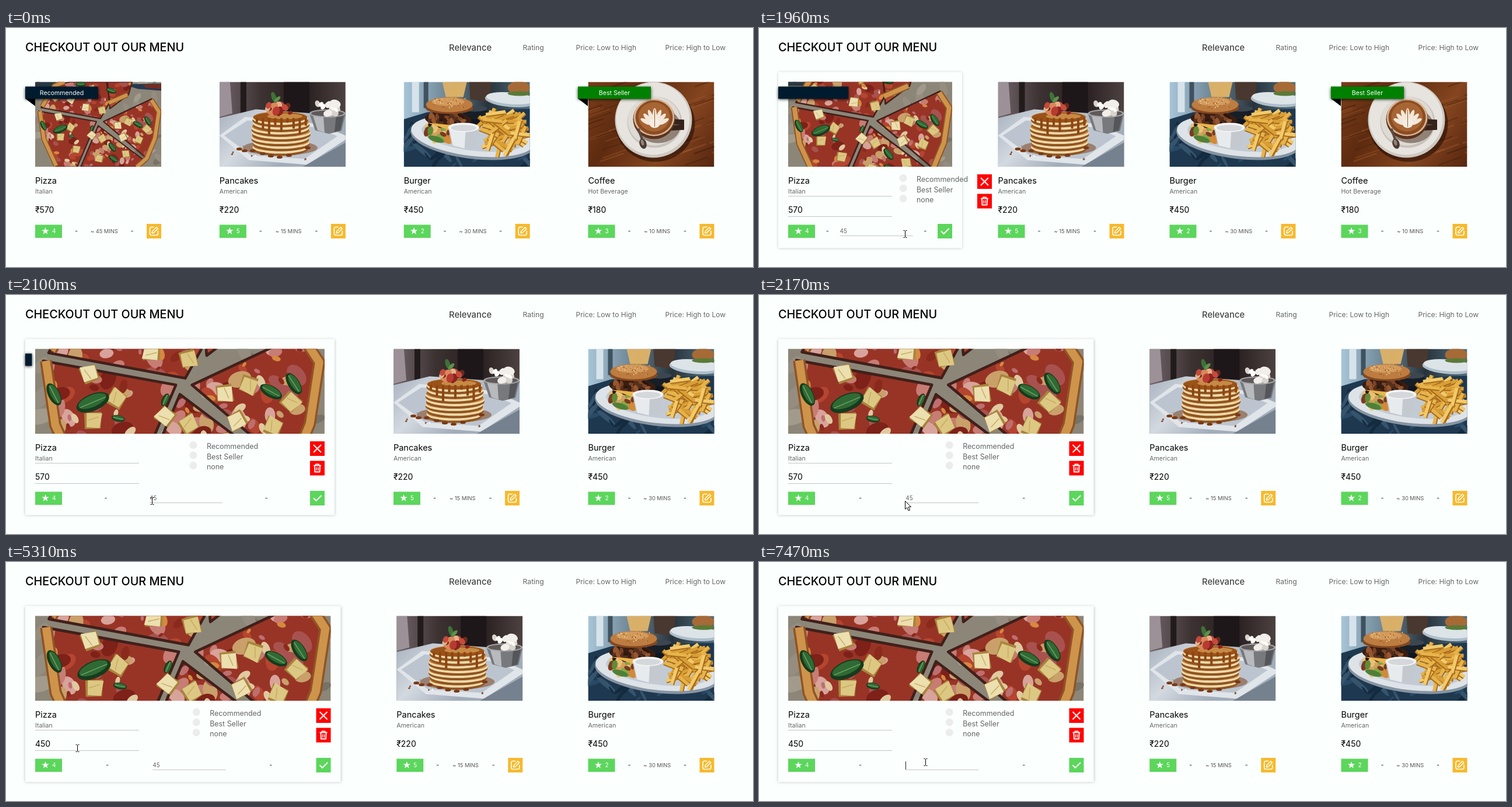
An HTML page with a canvas for the animation above (8000 ms loop, 1280 by 410 pixels).

```html
<!DOCTYPE html>
<html lang="en">
<head>
<meta charset="utf-8">
<title>Menu</title>
<style>
html, body { margin: 0; width: 100%; height: 100%; overflow: hidden; background: #fbfffe; }
canvas { display: block; }
</style>
</head>
<body>
<canvas id="stage" width="1280" height="410"></canvas>
<script>
const c = document.getElementById('stage').getContext('2d');
const BG = '#fbfffe', GREEN = '#5cd65c', AMBER = '#f7b92c', LOOP = 8000;
const CARD = 249.5, PAD = 17, LEFT = 33, ROW = 1197, TOP = 92.5, IMG_H = 145.5;

// ---------- helpers ----------
const ramp = (t, a, b) => Math.min(1, Math.max(0, (t - a) / (b - a)));
const last = (list, t) => list.filter(s => s[0] <= t).pop();

// CSS "ease" timing curve
function ease(p) {
  if (p <= 0 || p >= 1) return p <= 0 ? 0 : 1;
  let lo = 0, hi = 1, u;
  for (let i = 0; i < 20; i++) {
    u = (lo + hi) / 2;
    const v = 1 - u;
    if (.75 * u * v * v + .75 * u * u * v + u ** 3 < p) lo = u; else hi = u;
  }
  return .3 * u * (1 - u) ** 2 + 3 * u * u * (1 - u) + u ** 3;
}

let seed = 1;
const rnd = () => (seed = seed * 16807 % 2147483647) / 2147483647;

function rect(color, x, y, w, h) { c.fillStyle = color; c.fillRect(x, y, w, h); }

function ell(color, x, y, rx, ry = rx, rot = 0) {
  c.fillStyle = color;
  c.beginPath();
  c.ellipse(x, y, rx, ry, rot, 0, 7);
  c.fill();
}

function path(pts, close) {
  const p = new Path2D();
  for (let i = 0; i < pts.length; i += 2) p.lineTo(pts[i], pts[i + 1]);
  if (close) p.closePath();
  return p;
}

function poly(color, ...pts) { c.fillStyle = color; c.fill(path(pts, true)); }

function line(color, width, ...pts) {
  c.strokeStyle = color;
  c.lineWidth = width;
  c.stroke(path(pts));
}

function text(s, x, y, size, color, weight = 400, align = 'left') {
  c.font = `${weight} ${size}px Inter, "Open Sans", sans-serif`;
  c.fillStyle = color;
  c.textAlign = align;
  c.fillText(s, x, y);
  return c.measureText(s).width;
}

function at(x, y, draw, scale = 1) {
  c.save();
  c.translate(x, y);
  c.scale(scale, scale);
  draw();
  c.restore();
}

function scatter(n, colors, x, y, w, h, rx, ry) {
  for (let i = 0; i < n; i++) {
    const k = .5 + rnd();
    ell(colors[i % colors.length], x + rnd() * w, y + rnd() * h, rx * k, ry * k, rnd() * 3);
  }
}

function gradient(x0, y0, x1, y1, ...colors) {
  const g = c.createLinearGradient(x0, y0, x1, y1);
  colors.forEach((k, i) => g.addColorStop(i / (colors.length - 1), k));
  return g;
}

function pairs(list, draw) {
  for (let i = 0; i < list.length; i += 2) draw(list[i], list[i + 1], i / 2);
}

// ---------- pictures, 216 x 145 each ----------
function pizza() {
  rect('#8c8678', 0, 0, 216, 146);
  scatter(60, ['#a29b8b', '#777267', '#958d7f'], 0, 0, 216, 145, 8, 4);
  rect('#2a3843', 0, 0, 36, 22);
  poly('#24394f', 150, 4, 216, 3, 216, 15, 176, 12);
  poly('#7a2a20', 184, 5, 216, 4, 216, 12, 190, 10);
  const slices = [
    [6, 50, 105, 68, 72, 146, 36, 146, 14, 100],
    [10, 44, 32, 6, 60, 0, 122, 0, 128, 34, 112, 63],
    [117, 68, 200, 29, 214, 50, 206, 98, 192, 132],
    [108, 75, 190, 137, 176, 146, 78, 146],
    [124, 0, 166, 0, 160, 22, 128, 46]
  ].map(p => path(p, true));
  const all = new Path2D();
  slices.forEach(s => all.addPath(s));
  c.save();
  c.clip(all);
  rect('#983426', 0, 0, 216, 146);
  scatter(170, ['#b5452f', '#7d2119', '#c77c74', '#c9a06a', '#a8524f', '#d8a39a'], 0, 0, 216, 146, 6, 4);
  scatter(80, ['#e0c9a0', '#8a2a1c', '#bd6f70', '#d5893f'], 0, 0, 216, 146, 3.5, 2);
  c.restore();
  c.lineJoin = 'round';
  c.strokeStyle = '#40201a';
  c.lineWidth = 2;
  slices.forEach(s => c.stroke(s));
  for (const [k, w] of [['#8f5424', 9], ['#cf944b', 6]]) {
    line(k, w, 8, 50, 15, 98, 36, 144);
    line(k, w, 12, 42, 33, 7, 50, 0);
    line(k, w, 199, 31, 212, 51, 205, 97, 191, 131, 174, 146);
    line(k, w, 126, 36, 158, 22);
  }
  const fruit = [40, 60, 43, 94, 160, 68, 97, 92, 114, 97, 115, 48, 87, 44, 177, 99, 191, 80,
    151, 95, 155, 124, 70, 115, 62, 30, 34, 27, 96, 12, 142, 74, 110, 132, 60, 78];
  pairs(fruit, (x, y, i) => at(x, y, () => {
    c.rotate(i * 1.9);
    poly('#a8843c', -9, -5, 5, -9, 10, 4, -3, 9);
    poly(i % 3 ? '#dcc783' : '#ecdfb0', -8, -6, 5, -8, 8, 3, -4, 7);
    line('#c6a95c', .7, -4, -4, 2, 4);
  }, .85));
  const basil = [14, 75, 43, 81, 176, 73, 193, 67, 97, 79, 62, 93, 130, 15, 132, 112, 134, 132, 78, 4];
  pairs(basil, (x, y, i) => at(x, y, () => {
    c.rotate([1.1, -.4, .5, 1, 2, .2, .3, .9, .6, 0][i]);
    const r = i === 1 ? 13 : i < 4 || i > 5 ? 9 : 5;
    ell('#163b1c', 0, 0, r, r * .48);
    ell('#2f6a34', 0, -r * .08, r * .85, r * .34);
    line('#74a468', .6, -r * .8, 0, r * .8, 0);
  }));
}

function pancakes() {
  rect(gradient(0, 0, 216, 0, '#70646a', '#3d3232', '#261d1e', '#4d4241'), 0, 0, 216, 146);
  poly('#9b9197', 0, 0, 18, 0, 22, 54, 0, 60);
  rect('#221b1c', 36, 0, 10, 60);
  rect('#1d1719', 110, 0, 44, 52);
  poly(gradient(0, 50, 100, 146, '#a9b3bf', '#d3d9e0', '#a2adba'), 0, 62, 62, 47, 216, 58, 216, 146, 0, 146);
  poly('#e0e5ea', 0, 92, 44, 60, 170, 72, 216, 92, 216, 99, 150, 142, 50, 134);
  poly('#bcc5cf', 8, 92, 48, 66, 166, 78, 202, 93, 146, 132, 54, 126);
  poly('#76818f', 216, 104, 216, 146, 142, 146);
  ell('#9b7f70', 104, 113, 64, 13);
  scatter(18, ['#eef1f4', '#8d5641'], 20, 105, 130, 30, 1.4, 1);
  for (let i = 0; i < 7; i++) {
    const y = 112 - i * 8.2, x = 104 + (i % 2) * 2, r = 50 - Math.abs(i - 3) * .8;
    ell('#8f5421', x, y + 3, r, 12);
    ell('#f0d9a9', x, y, r, 11);
    ell(i % 2 ? '#c98a42' : '#b87530', x, y - 2.5, r - 1, 9.5);
  }
  ell('#9a5218', 104, 61, 46, 9);
  ell('#c68a45', 112, 59, 30, 5);
  for (let i = 0; i < 9; i++) {
    const x = 62 + i * 10.5;
    rect('#8d4513', x, 62, 4, 8 + (i * 7 % 5) * 5);
  }
  [[34, 115], [43, 118], [57, 118], [74, 123], [88, 127], [103, 129], [119, 126], [151, 113]]
    .forEach(p => ell('#7b3a14', p[0], p[1], 5, 2.6));
  scatter(18, ['#8c231f', '#c54a3b', '#d8875b', '#6a2a1d', '#e3b48c'], 82, 39, 42, 17, 6, 4.5);
  ell('#b83a30', 97, 50, 6, 8, .3);
  ell('#3f7138', 93, 26, 4, 9, -.3);
  ell('#5c9149', 99, 30, 3, 7, .8);
  poly('#77797d', 154, 54, 216, 54, 209, 84, 187, 89, 164, 83);
  poly('#b9babd', 160, 57, 178, 58, 180, 87, 168, 83);
  poly('#55565a', 200, 58, 213, 57, 207, 83, 197, 86);
  ell('#a6a7aa', 185, 54, 31, 7);
  ell('#5f5a59', 185, 54, 28, 5);
  scatter(18, ['#f2eee9', '#d9d3ce', '#fffdf9'], 167, 37, 36, 17, 7, 5);
}

function burger() {
  rect(gradient(0, 0, 216, 0, '#a8c5d8', '#6f8796', '#27333c', '#54707f'), 0, 0, 216, 146);
  rect('#d7e3ea', 14, 0, 12, 52);
  rect('#3e5260', 34, 0, 8, 45);
  poly('#d8b06a', 66, 0, 108, 0, 102, 26, 72, 26);
  poly('#49382f', 112, 0, 150, 0, 146, 34, 114, 30);
  poly('#1e3850', 0, 64, 40, 52, 216, 46, 216, 146, 0, 146);
  scatter(34, ['#284a66', '#142a3e', '#35546c'], 0, 65, 216, 80, 14, 3);
  ell('#aebec9', 183, 31, 44, 12, .08);
  ell('#dce4e8', 183, 28, 42, 10, .08);
  ell('#a66a36', 197, 10, 19, 11);
  ell('#5a7a38', 198, 20, 20, 4);
  ell('#8694a2', 118, 97, 107, 35, .12);
  ell('#dee3e8', 118, 93, 106, 34, .12);
  ell('#c2cbd4', 120, 92, 90, 26, .12);
  ell('#10161d', 122, 62, 21, 15);
  rect('#171e27', 101, 46, 42, 18);
  ell('#3b4650', 122, 46, 21, 5);
  ell('#d2a15d', 72, 90, 36, 15, .15);
  scatter(40, ['#5f8c37', '#82a848', '#d28a3a', '#e9c278', '#7c3a20'], 38, 76, 54, 24, 6, 3.5);
  ell('#381d12', 76, 64, 40, 13, .06);
  scatter(45, ['#55301d', '#2b150d', '#7a4327', '#96562e'], 44, 56, 64, 18, 5, 3);
  poly('#e9b44c', 40, 70, 82, 74, 100, 70, 76, 82);
  ell('#85481f', 78, 45, 41, 10);
  ell('#bd7c40', 78, 39, 40, 13);
  ell('#d29a5b', 76, 34, 28, 7);
  scatter(45, ['#ecd19a', '#9b5a2a'], 48, 28, 60, 18, 1, .7);
  line('#dcae5c', 1.2, 89, 28, 92, 0);
  line('#dcae5c', 1.2, 83, 28, 88, 2);
  ell('#4f8038', 55, 98, 14, 5, .3);
  for (let i = 0; i < 62; i++) {
    const a = rnd() * 6.3, r = Math.sqrt(rnd());
    at(168 + Math.cos(a) * r * 36, 83 + Math.sin(a) * r * 31, () => {
      c.rotate(rnd() * 2.2 - 1.4);
      rect('#a76b1d', -17, -3, 34, 7);
      rect(['#e7b44b', '#f2ca6a', '#d99f36'][i % 3], -17, -3.5, 34, 5.5);
    });
  }
  poly('#c3c9cf', 76, 78, 129, 78, 123, 110, 103, 115, 83, 110);
  poly('#e8ebee', 78, 80, 106, 80, 104, 114, 84, 109);
  ell('#f4f5f6', 102.5, 78, 26.5, 8);
  ell('#d5d8da', 102.5, 79, 22, 5.5);
}

function coffee() {
  rect(gradient(0, 0, 216, 146, '#7a3d1b', '#5e2b10', '#84451f', '#572610'), 0, 0, 216, 146);
  for (let i = 0; i < 55; i++) {
    const x = rnd() * 250 - 20, y = rnd() * 146;
    line(i % 2 ? 'rgba(43,17,5,.32)' : 'rgba(184,107,54,.28)', 1 + rnd() * 2, x, y, x + 40, y - 14);
  }
  ell('rgba(30,10,2,.55)', 115, 72, 68, 65);
  ell('#cdc8c0', 112, 65, 66, 65);
  ell('#e7e4df', 111, 63, 63, 62);
  ell('#c8c2ba', 114, 69, 47, 44);
  ell('#dedad4', 113, 67, 45, 42);
  ell('rgba(70,45,30,.5)', 120, 75, 38, 30);
  line('#35231b', 9, 142, 68, 160, 69, 160, 78, 140, 79);
  ell('#5b321d', 113, 64, 36, 34);
  ell('#d8b492', 113, 61, 35, 32);
  ell('#8c4c23', 113, 61, 32, 29.5);
  ell('#a86534', 113, 60, 27, 25);
  for (let i = -3; i <= 3; i++) {
    at(114, 76, () => {
      c.rotate(i * .36);
      ell('#f3e8da', 0, -17, 3.6, 14 - Math.abs(i) * 1.2);
    });
  }
  ell('#f6eee4', 114, 71, 9, 8);
  line('#9d5a2c', 1, 114, 47, 114, 77);
  line('#5b4a40', 4, 86, 80, 94, 103);
  ell('#4b3c34', 94, 106, 6, 9, -.3);
  ell('#94857a', 93, 104, 2.5, 5, -.3);
}

// ---------- interface parts ----------
function star(x, y) {
  const pts = [];
  for (let i = 0; i < 10; i++) {
    const r = i % 2 ? 2.6 : 6.6, a = i * Math.PI / 5;
    pts.push(x + r * Math.sin(a), y - r * Math.cos(a));
  }
  poly('#fff', ...pts);
}

function button(x, y, color, icon) {
  rect(color, x, y, 25, 25);
  at(x, y, icon);
}

function pencil(color) {
  c.strokeStyle = color;
  c.lineWidth = 1.6;
  c.beginPath();
  c.moveTo(13, 5.5);
  c.lineTo(8.5, 5.5);
  c.quadraticCurveTo(5.5, 5.5, 5.5, 8.5);
  c.lineTo(5.5, 16.5);
  c.quadraticCurveTo(5.5, 19.5, 8.5, 19.5);
  c.lineTo(16.5, 19.5);
  c.quadraticCurveTo(19.5, 19.5, 19.5, 16.5);
  c.lineTo(19.5, 12);
  c.stroke();
  line(color, 1.5, 9, 16, 9.8, 12.8, 16.8, 5.8, 19.2, 8.2, 12.2, 15.2, 9, 16);
}

const cross = () => { line('#fff', 2, 6, 6, 19, 19); line('#fff', 2, 19, 6, 6, 19); };
const tick = () => line('#fff', 2, 6, 12.5, 10.5, 17, 19.5, 8);

function trash() {
  line('#fff', 1.8, 6, 8, 19, 8);
  line('#fff', 1.8, 10, 8, 10, 5.8, 15, 5.8, 15, 8);
  line('#fff', 1.8, 7.8, 8, 8.4, 19, 16.6, 19, 17.2, 8);
  line('#fff', 1.4, 11, 11, 11, 16.5);
  line('#fff', 1.4, 14, 11, 14, 16.5);
}

function ribbon(x, w, color, label) {
  if (w < 2) return;
  if (label) poly('#000', x, 121, x + 17, 121, x + 17, 134);
  c.save();
  c.shadowColor = 'rgba(0,0,0,.8)';
  c.shadowBlur = 5;
  c.shadowOffsetY = 1;
  rect(color, x, 100.5, w, 21);
  c.restore();
  if (label) text(label, x + w / 2, 115, 10.6, '#fff', 400, 'center');
}

const pointers = {
  arrow() {
    const p = path([0, 0, 0, 14, 3.2, 11, 5.6, 16.5, 8, 15.5, 5.6, 10.2, 10, 10], true);
    c.fillStyle = '#fff';
    c.fill(p);
    c.strokeStyle = '#000';
    c.lineWidth = 1;
    c.stroke(p);
  },
  beam() {
    line('#000', 1, -3, -6, -1, -6, 0, -5, 1, -6, 3, -6);
    line('#000', 1, 0, -5, 0, 5);
    line('#000', 1, -3, 6, -1, 6, 0, 5, 1, 6, 3, 6);
  },
  hand() {
    const p = path([-1, 0, 1, 0, 2, 2, 2, 6, 4, 5.5, 5, 7, 7, 6.5, 8, 8, 10, 8.5, 10, 14, 8, 19, 0, 19,
      -5, 12, -4, 10, -2, 12, -2, 1], true);
    c.fillStyle = '#fff';
    c.fill(p);
    c.strokeStyle = '#000';
    c.lineWidth = 1.1;
    c.stroke(p);
    for (const x of [2, 5, 8]) line('#000', .8, x, 7, x, 10);
  }
};

// ---------- timeline ----------
const cards = [
  { name: 'Pizza', kind: 'Italian', price: 570, stars: 4, mins: 45, art: pizza },
  { name: 'Pancakes', kind: 'American', price: 220, stars: 5, mins: 15, art: pancakes },
  { name: 'Burger', kind: 'American', price: 450, stars: 2, mins: 30, art: burger },
  { name: 'Coffee', kind: 'Hot Beverage', price: 180, stars: 3, mins: 10, art: coffee }
];
const EDIT = 1830;
const priceKeys = [[0, '570'], [2720, '570'], [3450, '57'], [3650, '5'], [3780, ''], [4310, '4'], [4510, '45'], [4780, '450']];
const timeKeys = [[0, '45'], [6410, '45'], [7210, '4'], [7470, '']];
const moves = [
  [130, 15, 105], [300, 150, 200], [470, 443, 285], [650, 340, 325], [880, 238, 354],
  [1090, 242, 358], [1360, 250, 353], [2300, 250, 353], [2510, 122, 319], [5710, 122, 319],
  [5850, 132, 345], [5930, 180, 396], [6000, 225, 396], [6130, 262, 356], [6400, 285, 343], [LOOP, 285, 343]
];

function pointerAt(t) {
  const i = moves.findIndex(m => m[0] > t);
  if (i < 1) return null;
  const [t0, x0, y0] = moves[i - 1], [t1, x1, y1] = moves[i], p = ramp(t, t0, t1);
  return [x0 + (x1 - x0) * p, y0 + (y1 - y0) * p];
}

function pointerKind(x, y, editing, w) {
  const inside = (l, r, top, bottom) => x >= l && x <= r && y >= top && y <= bottom;
  if (inside(25 + w, 50 + w, 336, 361)) return 'hand';
  if (!editing) return 'arrow';
  const left = 50 + (w - 104) / 2;
  return inside(50, 228, 254, 324) || inside(left, left + 125, 338, 357) ? 'beam' : 'arrow';
}

function field(keys, t, x, y, size, color, focusEnd, top, bottom) {
  const [since, value] = last(keys, t);
  const width = text(value, x, y, size, color);
  if (since && t < focusEnd && (t - since) % 1060 < 530) rect('#222', Math.round(x + width), top, 1, bottom - top);
}

function picture(card, x, w) {
  c.save();
  c.beginPath();
  c.rect(x, TOP, w, IMG_H);
  c.clip();
  c.translate(x + w / 2, TOP + IMG_H / 2);
  c.scale(w / 216, w / 216);
  c.translate(-108, -72.75);
  seed = 41;
  card.art();
  c.restore();
}

function badge(card, x) {
  rect(GREEN, x, 337.5, 46, 22.5);
  star(x + 17.5, 348.5);
  text(card.stars, x + 29, 352, 10, '#fff');
}

function dash(x) { text('-', x, 352, 11, '#444', 500, 'center'); }

function heading(card, x) {
  text(card.name, x, 267, 14.5, '#000');
  text(card.kind, x, 284, 10.6, '#666');
}

function plainCard(card, x, hover) {
  picture(card, x, 216);
  heading(card, x);
  text('₹' + card.price, x, 317, 14, '#000');
  badge(card, x);
  dash(x + 70.5);
  text(`~ ${card.mins} MINS`, x + 118.3, 352, 9.3, '#555', 400, 'center');
  dash(x + 166);
  button(x + 191, 336, AMBER, () => {
    if (hover) {
      c.globalAlpha = hover;
      rect('#fdeecb', .5, .5, 24, 24);
      c.globalAlpha = 1;
      c.strokeStyle = AMBER;
      c.lineWidth = 1;
      c.strokeRect(.5, .5, 24, 24);
    }
    pencil('#fff');
    if (hover) { c.globalAlpha = hover; pencil('#f8c453'); }
  });
}

function editCard(card, x, w, t) {
  picture(card, x, w);
  heading(card, x);
  rect('#c4c6c6', x, 288, 178, 1);
  rect('#c4c6c6', x, 323, 178, 1);
  field(priceKeys, t, x, 317, 14, '#000', 6410, 302, 322);
  const label = x + Math.max(220, w / 2 + 46);
  ['Recommended', 'Best Seller', 'none'].forEach((s, i) => {
    ell('#ececec', label - 23, 257.5 + i * 17.5, 6.5);
    text(s, label, 264 + i * 17.5, 12.4, '#666');
  });
  const side = x + Math.max(324, w - 25);
  button(side, 251, '#f00', cross);
  button(side, 284.5, '#f00', trash);
  badge(card, x);
  const input = x + (w - 104) / 2, gap = (w - 206) / 4;
  dash(x + 48.5 + gap);
  rect('#c4c6c6', input, 356, 125, 1);
  field(timeKeys, t, input, 352, 10, '#666', LOOP, 342, 356);
  dash(input + 127.5 + gap);
  button(x + w - 25, 336, GREEN, tick);
}

function frame(now) {
  const t = now % LOOP, editing = t >= EDIT;
  const first = CARD + 291 * ease(ramp(t, 1921, 2158));
  const shown = first > ROW - 3 * CARD ? 3 : 4;
  const gap = (ROW - first - (shown - 1) * CARD) / (shown - 1);
  const w = first - 2 * PAD;

  c.lineCap = 'butt';
  rect(BG, 0, 0, 1280, 410);
  text('CHECKOUT OUT OUR MENU', 33, 40, 19.8, '#000', 500);
  text('Relevance', 759, 38.5, 14.8, '#444', 500);
  text('Rating', 885.5, 38, 12.2, '#666');
  text('Price: Low to High', 976.5, 38, 12, '#666');
  text('Price: High to Low', 1129.5, 38, 12, '#666');

  const lift = ramp(t, 250, 750) - ramp(t, 5860, 5930) + ramp(t, 6000, 6060);
  if (lift > 0) {
    c.save();
    c.shadowColor = `rgba(0,0,0,${.25 * lift})`;
    c.shadowBlur = 5;
    rect(BG, LEFT, 75.5, first, 302);
    c.restore();
  }

  for (let i = 1; i < shown; i++) plainCard(cards[i], LEFT + first + gap + (i - 1) * (CARD + gap) + PAD, 0);
  if (editing) editCard(cards[0], LEFT + PAD, w, t);
  else plainCard(cards[0], LEFT + PAD, ramp(t, 920, 1120));

  ribbon(LEFT, 125 * (1 - ease(ramp(t, 1948, 2188))), '#001b2e', editing ? '' : 'Recommended');
  if (shown === 4) ribbon(980, 125, '#008000', 'Best Seller');

  const spot = pointerAt(t);
  if (spot) {
    const [x, y] = spot.map(v => Math.round(v) + .5);
    at(x, y, pointers[pointerKind(spot[0], spot[1], editing, w)]);
  }
  requestAnimationFrame(frame);
}
requestAnimationFrame(frame);
</script>
</body>
</html>
```
